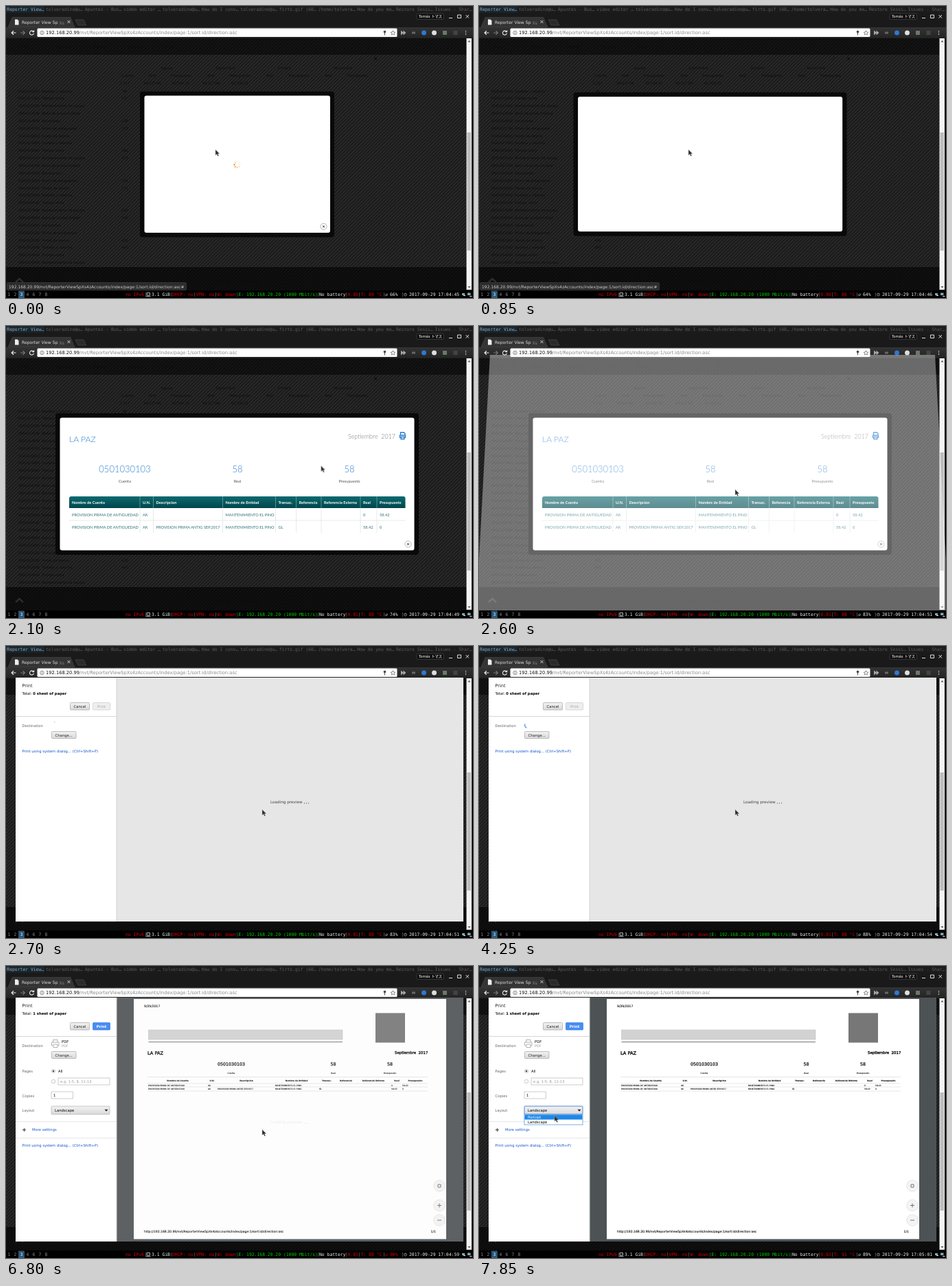
An HTML page for the animation above (8 s loop, 680 by 425 pixels).

```html
<!DOCTYPE html>
<html lang="es">
<head>
<meta charset="utf-8">
<title>Reporter View</title>
<style>
html, body { margin: 0; width: 100%; height: 100%; overflow: hidden; background: #000; }
svg { display: block; width: 680px; height: 425px; }
text { font-family: "DejaVu Sans", sans-serif; font-size: 5.28px; dominant-baseline: central; white-space: pre; }
.mono text, .mono { font-family: "DejaVu Sans Mono", monospace; font-size: 6.4px; }
.lato text { font-family: Lato, sans-serif; font-size: 5.7px; }
.mid { text-anchor: middle; }
.bold { font-weight: 700; }
.red { fill: #d80000; }
.grey { fill: #666; }
.link { fill: #1155cc; }
.lato .big { font-size: 12.2px; font-weight: 300; fill: #2b7fd0; }
.lato .num { font-size: 13px; }
.ghost text { font-size: 4.9px; fill: #0e0e0e; }
.pdf text { font-size: 3px; fill: #111; stroke: #111; stroke-width: .12px; }
.pdf .foot { font-size: 4.55px; }
.pdf .title { font-size: 6.6px; stroke-width: .35px; }
.pdf .date { font-size: 5.4px; stroke-width: .35px; }
.pdf .sum { font-size: 6.3px; stroke-width: .25px; }
.lato .head { font-weight: 700; fill: #fff; }
.lato .cell { fill: #2f6f78; }
.pdf .head { font-weight: 700; }

/* one 8 s cycle; 1% = 80 ms */
.cut { animation: 8s step-end infinite; }
.bubble { animation-name: bubble; }
.loader { animation-name: loader; }
.modal { animation-name: modal; }
.sheet1 { animation-name: sheet1; }
.sheet2 { animation-name: sheet2; }
.print { animation-name: print; }
.wait { animation-name: wait; }
.ready { animation-name: ready; }
.search { animation-name: search; }
.found { animation-name: found; }
.pdf { animation-name: pdf; }
.menu { animation-name: menu; }
@keyframes bubble { 0% { opacity: 1 } 18.6% { opacity: 0 } }
@keyframes loader { 0% { opacity: 1 } 10.5% { opacity: 0 } }
@keyframes modal { 0% { opacity: 0 } 12.3% { opacity: 1 } }
@keyframes sheet1 { 0% { opacity: 0 } 32.3% { opacity: .38 } 32.95% { opacity: 0 } }
@keyframes sheet2 { 0% { opacity: 0 } 32.95% { opacity: .8 } 33.6% { opacity: 0 } }
@keyframes print { 0% { opacity: 0 } 33.6% { opacity: 1 } }
@keyframes wait { 0% { opacity: 1 } 80.5% { opacity: 0 } }
@keyframes ready { 0% { opacity: 0 } 80.5% { opacity: 1 } }
@keyframes search { 0% { opacity: 1 } 74.8% { opacity: 0 } }
@keyframes found { 0% { opacity: 0 } 74.8% { opacity: 1 } }
@keyframes pdf { 0% { opacity: 0 } 84.8% { opacity: .9 } 85.4% { opacity: 1 } }
@keyframes menu { 0% { opacity: 0 } 96% { opacity: 1 } }

.frame { animation: frame 8s infinite; }
.pane { animation: pane 8s infinite; }
@keyframes frame {
  0%, 10% { x: 195px; y: 124.5px; width: 283px; height: 212px; }
  12.3%, 100% { x: 72px; y: 127px; width: 529px; height: 206px; }
}
@keyframes pane {
  0%, 10% { x: 201.5px; y: 130.5px; width: 270.5px; height: 199.5px; }
  12.3%, 100% { x: 78.5px; y: 133.5px; width: 516px; height: 193px; }
}
.spin { transform-origin: 336.5px 231px; animation: spin 8s infinite; }
@keyframes spin {
  0%, .5% { transform: rotate(0deg); animation-timing-function: steps(11); }
  7.4%, 100% { transform: rotate(330deg); }
}
.options { animation: options 8s ease-out infinite; }
.syslink { animation: syslink 8s ease-out infinite; }
@keyframes options { 0%, 75.6% { clip-path: inset(0 0 100% 0); } 79%, 100% { clip-path: inset(0); } }
@keyframes syslink { 0%, 75.6% { transform: none; } 79%, 100% { transform: translateY(108.5px); } }

.turn { transform-origin: 71px 115px; animation: turn .8s -.5s linear infinite; }
.arc { animation: arc .8s -.5s linear infinite; }
@keyframes turn { from { transform: rotate(-100deg) } to { transform: rotate(260deg) } }
@keyframes arc {
  0% { stroke-dasharray: 10 350; stroke-dashoffset: 0; }
  50% { stroke-dasharray: 200 160; stroke-dashoffset: -30; }
  94% { stroke-dasharray: 90 270; stroke-dashoffset: -233; }
  100% { stroke-dasharray: 10 350; stroke-dashoffset: -360; }
}
.hop { animation: hop 1s -.21s infinite; }
.hop + .hop { animation-delay: -.1s; }
.hop + .hop + .hop { animation-delay: -.01s; }
@keyframes hop { 0%, 32%, 100% { transform: none } 16% { transform: translateY(-3px) } }

.cursor { animation: cursor 8s ease-in-out infinite; }
@keyframes cursor {
  0%, 17.6% { transform: translate(305px, 209px); }
  22.5%, 24.2% { transform: translate(574px, 157px); }
  28%, 91% { transform: translate(373px, 238px); }
  93.4% { transform: translate(140px, 90px); }
  95.2%, 96.2% { transform: translate(132px, 208px); }
  97.8%, 100% { transform: translate(110px, 218px); }
}
</style>
</head>
<body>
<svg viewBox="0 0 680 425">
  <defs>
    <pattern id="stripes" width="5" height="5" patternUnits="userSpaceOnUse">
      <rect width="5" height="5" fill="#292929"/>
      <path d="M-1 1L1 -1M0 5L5 0M4 6L6 4" stroke="#191919" stroke-width="1.7"/>
    </pattern>
    <linearGradient id="teal" x2="0" y2="1"><stop stop-color="#0b6a70"/><stop offset="1" stop-color="#00464c"/></linearGradient>
    <linearGradient id="btn" x2="0" y2="1"><stop stop-color="#f2f2f2"/><stop offset="1" stop-color="#d9d9d9"/></linearGradient>
    <linearGradient id="bar" x2="0" y2="1"><stop stop-color="#333"/><stop offset="1" stop-color="#242424"/></linearGradient>
    <g id="close">
      <circle r="4.600" fill="#fff" stroke="#999" stroke-width=".7"/>
      <path d="M-1.300 -1.500l2.600 3m0-3l-2.600 3" stroke="#222" stroke-width=".9"/>
    </g>
  </defs>

  <!-- page under the dark overlay -->
  <rect y="46" width="671" height="368" fill="url(#stripes)"/>
  <rect y="47" width="671" height="24" opacity=".5"/>
  <rect y="380" width="671" height="34" opacity=".6"/>
  <g class="ghost" id="ghost"></g>
  <path d="M14 402l5.500-5 5.500 5" fill="none" stroke="#2c2c2c" stroke-width="2.500"/>
  <rect x="670.500" y="47" width="7.500" height="366" fill="#f4f4f4"/>
  <rect x="671.500" y="184" width="5.500" height="172" fill="#bdbdbd"/>
  <path d="M672.500 52.500l2-2.500 2 2.500zM672.500 408l2 2.500 2-2.500z" fill="#555"/>
  <g class="cut bubble">
    <rect x="1.500" y="402.500" width="261" height="11" rx="1.500" fill="#2c2c2c" stroke="#4a4a4a" stroke-width=".5"/>
    <text x="4" y="408" fill="#ccc" style="font-size:6.02px">192.168.20.99/nvt/ReporterViewSpXs4zAccounts/index/page:1/sort:id/direction:asc#</text>
  </g>

  <!-- browser -->
  <rect width="680" height="46.500" fill="#1a1a1a"/>
  <g class="mono" id="windows"></g>
  <path d="M3 31L9 16.500H94L100 31z" fill="#343434" stroke="#555" stroke-width=".4"/>
  <path d="M101 20h12l4 8h-12z" fill="#2a2a2a" stroke="#555" stroke-width=".5"/>
  <rect y="31" width="680" height="15.500" fill="url(#bar)"/>
  <path d="M13 19.500h3.500l2 2v6h-5.500z" fill="#eee"/>
  <text x="23" y="23.500" fill="#ddd" style="font-size:6.100px">Reporter View Sp <tspan fill="#888">Xs</tspan></text>
  <path d="M89.500 21l4 4m0-4l-4 4" stroke="#ddd" stroke-width=".9"/>
  <rect x="598" y="11" width="39.500" height="8.500" rx="1.500" fill="#111" stroke="#555" stroke-width=".5"/>
  <text class="mid" x="618" y="15.300" fill="#fff" style="font-family:'DejaVu Sans','Noto Sans CJK JP',sans-serif">Tomás トマス</text>
  <path d="M645 17.500h5M657.500 13h5v4.500h-5zM669.500 13l4.500 4.500m0-4.500l-4.500 4.500" fill="none" stroke="#ddd"/>
  <path d="M14.500 39h-6m2.500-2.800l-2.800 2.800 2.800 2.800" fill="none" stroke="#eee" stroke-width="1.200"/>
  <path d="M21 39h6m-2.500-2.800l2.800 2.800-2.800 2.800" fill="none" stroke="#777" stroke-width="1.200"/>
  <path d="M39.800 37.200a3 3 0 1 0 .6 2.600m.3-4.200v2.200h-2.400" fill="none" stroke="#eee" stroke-width="1.100"/>
  <rect x="45.500" y="32.500" width="524" height="12.500" rx="1.500" fill="#fff"/>
  <circle cx="52.500" cy="39" r="2.700" fill="none" stroke="#555" stroke-width=".7"/>
  <path d="M52.500 38.500v2M52.500 37v.7" stroke="#555" stroke-width=".8"/>
  <text x="58" y="39" fill="#888" style="font-size:6.700px"><tspan fill="#111">192.168.20.99</tspan>/nvt/ReporterViewSpXs4zAccounts/index/page:1/sort:id/direction:asc</text>
  <circle cx="551.500" cy="37.500" r="1.800" fill="#444"/><path d="M551.500 38v4.500" stroke="#444"/>
  <path d="M563.500 35.800l1 2.200 2.300.2-1.800 1.600.6 2.300-2.100-1.300-2.100 1.300.6-2.300-1.800-1.600 2.300-.2z" fill="none" stroke="#444" stroke-width=".6"/>
  <path d="M575 35.500l4 3.500-4 3.500zM578.500 35.500l4 3.500-4 3.500z" fill="#aaa"/>
  <rect x="591" y="37.500" width="5" height="3" fill="#666"/>
  <circle cx="608.500" cy="39" r="3.500" fill="#2c78d4"/>
  <circle cx="623.500" cy="39" r="3.500" fill="#ddd"/>
  <rect x="636" y="36" width="6" height="6" fill="#687a68"/>
  <rect x="651.500" y="36" width="6" height="6" fill="#444"/>
  <path d="M669.500 36v1.200m0 1.200v1.200m0 1.200v1.200" stroke="#ddd" stroke-width="1.200"/>

  <!-- report popup -->
  <rect class="frame" rx="4" fill="#090909"/>
  <rect class="pane" rx="3" fill="#fff"/>
  <g class="cut loader">
    <g class="spin" id="petals"></g>
    <use href="#close" x="462.500" y="321"/>
  </g>
  <g class="cut modal lato">
    <text class="big" x="92" y="164">LA PAZ</text>
    <text x="498" y="160" style="font-size:8.900px;font-weight:300" fill="#777">Septiembre  2017</text>
    <path d="M574.500 158v-3h5l1.500 1.500v1.500M573.500 163v-4h8v4M575 161.500h5v3h-5z" fill="none" stroke="#2176cf" stroke-width="1.300"/>
    <g id="modalTable"></g>
    <use href="#close" x="585.500" y="317.500"/>
  </g>

  <!-- print dialog swinging in -->
  <polygon class="cut sheet1" points="16,42 664,42 684,414 -4,414" fill="#fff"/>
  <polygon class="cut sheet2" points="14.500,44.500 665.500,44.500 671,405 9,405" fill="#e6e6e6"/>

  <g class="cut print">
    <rect x="14" y="46" width="652" height="355" fill="#e6e6e6"/>
    <rect x="14" y="46" width="147" height="355" fill="#fff"/>
    <path d="M161 46v355M14 102.500h147" stroke="#c4c4c4" stroke-width=".7"/>
    <text x="23.500" y="57.500" style="font-size:6.500px" fill="#222">Print</text>
    <g class="cut wait">
      <text x="23.500" y="69">Total: <tspan class="bold">0 sheet of paper</tspan></text>
      <rect x="126.500" y="82.500" width="25" height="10.500" rx="1" fill="#eee" stroke="#ccc" stroke-width=".7"/>
      <text class="mid" x="139" y="87.500" fill="#aaa">Print</text>
    </g>
    <g class="cut ready">
      <text x="23.500" y="69">Total: <tspan class="bold">1 sheet of paper</tspan></text>
      <rect x="126.500" y="82.500" width="25" height="10.500" rx="1" fill="#4a8df0" stroke="#3079ed" stroke-width=".7"/>
      <text class="mid bold" x="139" y="87.500" fill="#fff">Print</text>
    </g>
    <rect x="93.500" y="82.500" width="28" height="10.500" rx="1" fill="url(#btn)" stroke="#a5a5a5" stroke-width=".7"/>
    <text class="mid" x="107.500" y="87.500" fill="#222">Cancel</text>
    <text class="grey" x="23.500" y="116">Destination</text>
    <rect x="66.500" y="124.500" width="35.500" height="10" rx="1" fill="url(#btn)" stroke="#a5a5a5" stroke-width=".7"/>
    <text class="mid" x="84.200" y="129.500" fill="#222">Change...</text>
    <g class="cut search"><g class="turn">
      <circle class="arc" cx="71" cy="115" r="4.300" pathLength="360" fill="none" stroke="#3f7fe6" stroke-width="1.300"/>
    </g></g>
    <g class="cut found">
      <path d="M68.500 111v-3.500h6.500v3.500M68.500 116h-2v-5h10.500v5h-2M69 114h6v4.500h-6z" fill="none" stroke="#aaa" stroke-width=".9"/>
      <text x="81" y="110">PDF</text><text x="81" y="116" fill="#999" style="font-size:4.800px">PDF</text>
    </g>
    <g class="options">
      <path d="M14 141h147" stroke="#fff"/>
      <g class="grey"><text x="23.500" y="153">Pages</text><text x="23.500" y="188.500">Copies</text><text x="23.500" y="210">Layout</text></g>
      <g fill="#fff" stroke="#aaa" stroke-width=".6">
        <circle cx="69" cy="153" r="2.700"/><circle cx="69" cy="168" r="2.700"/>
        <rect x="76" y="163" width="75" height="10"/><rect x="66" y="183" width="31.500" height="10"/>
        <rect x="66" y="204" width="85" height="12" rx="1" fill="url(#btn)"/>
      </g>
      <circle cx="69" cy="153" r="1.300" fill="#444"/>
      <text x="76" y="153">All</text>
      <text x="79" y="168.300" fill="#999">e.g. 1-5, 8, 11-13</text>
      <text x="69" y="188.300">1</text>
      <text x="71" y="210">Landscape</text>
      <path d="M143.500 208.800h5l-2.500 3z" fill="#222"/>
      <path d="M14 226.500h147M14 250.500h147" stroke="#ddd" stroke-width=".7"/>
      <path d="M24 238.500h5m-2.500-2.500v5" stroke="#444" stroke-width="1.100"/>
      <text class="link" x="38" y="238">More settings</text>
    </g>
    <text class="link syslink" x="23.500" y="152.500">Print using system dialog... (Ctrl+Shift+P)</text>

    <g fill="#444">
      <text x="385" y="227" style="font-size:5.700px">Loading preview</text>
      <g class="cut wait">
        <circle class="hop" cx="434.500" cy="228.800" r=".6"/><circle class="hop" cx="437.500" cy="228.800" r=".6"/><circle class="hop" cx="440.500" cy="228.800" r=".6"/>
      </g>
      <path class="cut ready" d="M434 228.800h1.200m1.800 0h1.200m1.800 0h1.200" stroke="#444" stroke-width="1.200"/>
    </g>
    <g class="cut pdf">
      <rect x="161.500" y="46" width="504.500" height="355" fill="#4d5255"/>
      <rect x="186" y="48" width="455" height="349.500" fill="#fff"/>
      <text class="foot" x="201" y="58.500">9/29/2017</text>
      <rect x="207.500" y="93" width="282.500" height="14" fill="#d2d2d2" stroke="#bbb" stroke-width=".5"/>
      <path d="M207.500 110.500h282.500" stroke="#999" stroke-width="1.300"/>
      <rect x="538" y="68.500" width="43" height="43" fill="#777"/>
      <g id="pdfTable"></g>
      <text class="foot" x="201" y="386.500">http://192.168.20.99/nvt/ReporterViewSpXs4zAccounts/index/page:1/sort:id/direction:asc</text>
      <text class="foot" x="618.500" y="386.500">1/1</text>
      <g fill="#f4f4f4" stroke="#ddd" stroke-width=".7"><circle cx="631" cy="320" r="8.300"/><circle cx="631" cy="348.500" r="8.300"/><circle cx="631" cy="370" r="8.300"/></g>
      <path d="M628 319h2v-2m2 0v2h2m0 2h-2v2m-2 0v-2h-2M628 348.500h6m-3-3v6M628 370h6" fill="none" stroke="#666" stroke-width=".9"/>
    </g>
    <g class="cut menu">
      <rect x="66" y="204" width="85" height="12" rx="1" fill="none" stroke="#4d90fe" stroke-width=".8"/>
      <rect x="66" y="216" width="85" height="15" fill="#fff" stroke="#1e78d0" stroke-width=".6"/>
      <rect x="66.500" y="216.500" width="84" height="7" fill="#1e88e8"/>
      <text x="71" y="220" fill="#fff">Portrait</text><text x="71" y="227">Landscape</text>
    </g>
  </g>

  <!-- desktop bar -->
  <rect y="414" width="680" height="11"/>
  <rect x="18.500" y="415" width="8" height="10" fill="#285577" stroke="#4c7899" stroke-width=".5"/>
  <g class="mono" id="status"></g>
  <path d="M205 417.500h4.500v3.500h-4.500zM204 422.500h6.500" fill="none" stroke="#ddd" stroke-width=".8"/>
  <circle cx="581.500" cy="420" r="2" fill="none" stroke="#aaa" stroke-width=".7"/>
  <path d="M581.500 418.800v1.200h1" fill="none" stroke="#aaa" stroke-width=".5"/>
  <path d="M664 418h4v3h-4zM672 417.500h4.500v3.500h-4.500z" fill="#7da7b8"/><path d="M666 421.500h3M675 422.500h3.500" stroke="#ddd" stroke-width="1.200"/>

  <path class="cursor" d="M0 0V8.200L1.900 6.600L3.300 9.600L4.700 9L3.400 6.100H5.900z" fill="#2e2e2e" stroke="#bbb" stroke-width=".4"/>
</svg>
<script>
const $ = id => document.getElementById(id);
const NS = 'http://www.w3.org/2000/svg';

function add(parent, tag, attrs, content) {
  const el = document.createElementNS(NS, tag);
  for (const k in attrs) el.setAttribute(k, attrs[k]);
  if (content != null) el.textContent = content;
  return parent.appendChild(el);
}
const text = (g, x, y, s, cls = '', fill) =>
  add(g, 'text', fill ? { x, y, class: cls, fill } : { x, y, class: cls }, s);

// window list
const user = 'tolveradino@u…';
['Reporter View…', user, 'Apuntes - Bus…', 'video editor …', user, 'How do I conv…', user,
  'firts.gif (60…', '/home/tolvera…', 'How do you me…', 'Restore Sessi…', 'Issues - Shar…'
].forEach((s, i) => {
  const x = i * 680 / 12;
  add($('windows'), 'rect', { x, y: 0, width: 56.2, height: 9.5, fill: i ? '#1c1c1c' : '#172833' });
  text($('windows'), x + 1.3, 4.8, s, '', i ? '#5e5e5e' : '#a8a8a8');
});

// dimmed accounts list
const ghost = $('ghost');
['Agosto', 'Septiembre', 'Octubre', 'Noviembre'].forEach((m, i) => {
  const x = 213 + 85.6 * i;
  text(ghost, x + 21, 90, m, 'mid');
  text(ghost, x, 101, 'Real', 'mid');
  text(ghost, x + 42, 101, 'Presupuesto', 'mid');
  if (i < 2) text(ghost, x, 112, '64,517.69', 'mid'), text(ghost, x + 42, 112, '62,100.31', 'mid');
});
text(ghost, 177, 101, 'Cuenta', 'mid');
text(ghost, 173, 112, '1,117', 'mid');
const kinds = ['Sueldos y salarios', 'Prima de antiguedad', 'Bono de productividad', 'Tiempo extra', 'Fondo de ahorro', 'Vacaciones', 'Mantenimiento de equipo'];
for (let i = 0; i < 24; i++) {
  text(ghost, 18, 123.5 + i * 10.85, '05010' + (10200 + i * 1100) + '  ' + kinds[i * 3 % 7]);
  if (i % 4 < 2) text(ghost, 173, 123.5 + i * 10.85, 90 + i * 37 % 400, 'mid');
}
['Inicio', 'Reportes', 'Cuentas', 'Usuarios', 'Ayuda'].forEach((s, i) => text(ghost, 22 + i * 52, 59, s));
text(ghost, 516, 76, '⤢', 'mid');
text(ghost, 538, 76, '▣', 'mid');
text(ghost, 340, 400, 'Sistema de reportes 2017', 'mid');

// loading ring
for (let i = 0; i < 8; i++)
  add($('petals'), 'ellipse', {
    cx: 336.5, cy: 227, rx: .9, ry: 1.3, fill: '#f08a24',
    opacity: [.12, .12, .15, .3, .5, .9, 1, .5][i], transform: `rotate(${i * 45} 336.5 231)`
  });

// report table, shared by popup and printed sheet
const heads = ['Nombre de Cuenta', 'U.N.', 'Descripcion', 'Nombre de Entidad', 'Transac.', 'Referencia', 'Referencia Externa', 'Real', 'Presupuesto'];
const entity = 'MANTENIMIENTO EL PINO', account = 'PROVISION PRIMA DE ANTIGUEDAD';
const rows = [
  [account, 'AK', '', entity, '', '', '', '0', '58.42'],
  [account, 'AK', 'PROVISION PRIMA ANTIG SEP.2017', entity, 'GL', '', '', '58.42', '0']
];
function cells(g, list, xs, y, cls) {
  list.forEach((s, i) => s && text(g, xs[i], y, s, cls));
}
function totals(g, xs, yNum, yLabel, cls) {
  ['0501030103', '58', '58'].forEach((s, i) => text(g, xs[i], yNum, s, cls));
  ['Cuenta', 'Real', 'Presupuesto'].forEach((s, i) => text(g, xs[i], yLabel, s, 'mid', '#555'));
}

const mt = $('modalTable'), edges = [92, 195, 214.5, 315.5, 392.5, 422.5, 459, 516, 540];
totals(mt, [173, 337, 500], 208, 225, 'mid big num');
add(mt, 'path', { d: 'M92 265V251q0-3 3-3H578.5q3 0 3 3V265z', fill: 'url(#teal)' });
add(mt, 'path', { d: 'M92 283h490' + edges.slice(1).map(x => `M${x} 265v36`).join(''), stroke: '#dde3e3', 'stroke-width': .7 });
add(mt, 'path', { d: edges.slice(1).map(x => `M${x} 248v17`).join(''), stroke: '#8fb9bb', 'stroke-width': .6 });
const inset = edges.map(x => x + 4);
cells(mt, heads, inset, 256.5, 'head');
rows.forEach((r, i) => cells(mt, r, inset, 274.5 + i * 17.7, 'cell'));

const pt = $('pdfTable');
text(pt, 206, 126.5, 'LA PAZ', 'title');
text(pt, 566, 125.5, 'Septiembre  2017', 'date');
totals(pt, [328, 476.5, 559], 142.5, 156, 'mid sum');
add(pt, 'path', { d: 'M206 161.5h408M206 171h408M206 176h408M206 182h408', stroke: '#ccc', 'stroke-width': .5 });
cells(pt, heads, [250, 300, 350, 423, 467, 495, 535, 569, 596], 167, 'mid head');
rows.forEach((r, i) => cells(pt, r, [207, 294, 308, 392, 456, 480, 520, 561, 577], 173.5 + i * 5.6));

// status line
const bar = $('status');
['1', '2', '3', '4', '6', '7', '8'].forEach((s, i) => text(bar, 4.5 + i * 9, 420, s, 'mid', i == 2 ? '#fff' : '#888'));
[203, 240.5, 274.5, 305, 336.5, 454.5, 495.5, 514.5, 550, 577].forEach(x =>
  add(bar, 'rect', { x, y: 417, width: .6, height: 6, fill: '#777' }));
text(bar, 174, 420, 'no IPv6', 'red');
text(bar, 212, 420, '3.1 GiB', '', '#eee');
text(bar, 242, 420, 'DHCP: no', 'red');
text(bar, 276.5, 420, 'VPN: no', 'red');
text(bar, 307.5, 420, 'W: down', 'red');
text(bar, 338.5, 420, 'E: 192.168.20.20 (1000 Mbit/s)', '', '#00d000');
text(bar, 456, 420, 'No battery', '', '#eee');
const load = text(bar, 497.5, 420, '', 'red');
const temp = text(bar, 516.5, 420, '', 'red');
const icon = text(bar, 552, 420, '↺', '', '#eee');
const cpu = text(bar, 559, 420, '', '', '#eee');
const clock = text(bar, 587, 420, '', '', '#eee');

// start time, load, temperature, cpu %
const stats = [[0, '0.80', 84, 66], [500, '0.80', 86, 64], [980, '0.81', 88, 63], [1850, '0.81', 88, 74],
  [2240, '0.81', 88, 83], [3580, '0.81', 88, 88], [4580, '0.83', 88, 90], [7080, '0.83', 88, 89], [7580, '0.83', 91, 89]];
const ticks = [500, 980, 1450, 1850, 2240, 2580];

function showStatus(t) {
  const [, l, c, p] = stats.findLast(s => s[0] <= t);
  const sec = 45 + ticks.filter(k => k <= t).length + Math.max(0, Math.floor((t - 2580) / 500));
  load.textContent = l;
  temp.textContent = `T: ${c} °C`;
  cpu.textContent = p + '%';
  for (const el of [icon, cpu]) el.setAttribute('fill', p >= 90 ? '#d80000' : '#eee');
  clock.textContent = '2017-09-29 17:' + (sec < 60 ? '04:' + sec : '05:0' + (sec - 60));
}

let start;
function tick(now) {
  start ??= now;
  showStatus((now - start) % 8000);
  requestAnimationFrame(tick);
}
showStatus(0);
requestAnimationFrame(tick);
</script>
</body>
</html>
```
